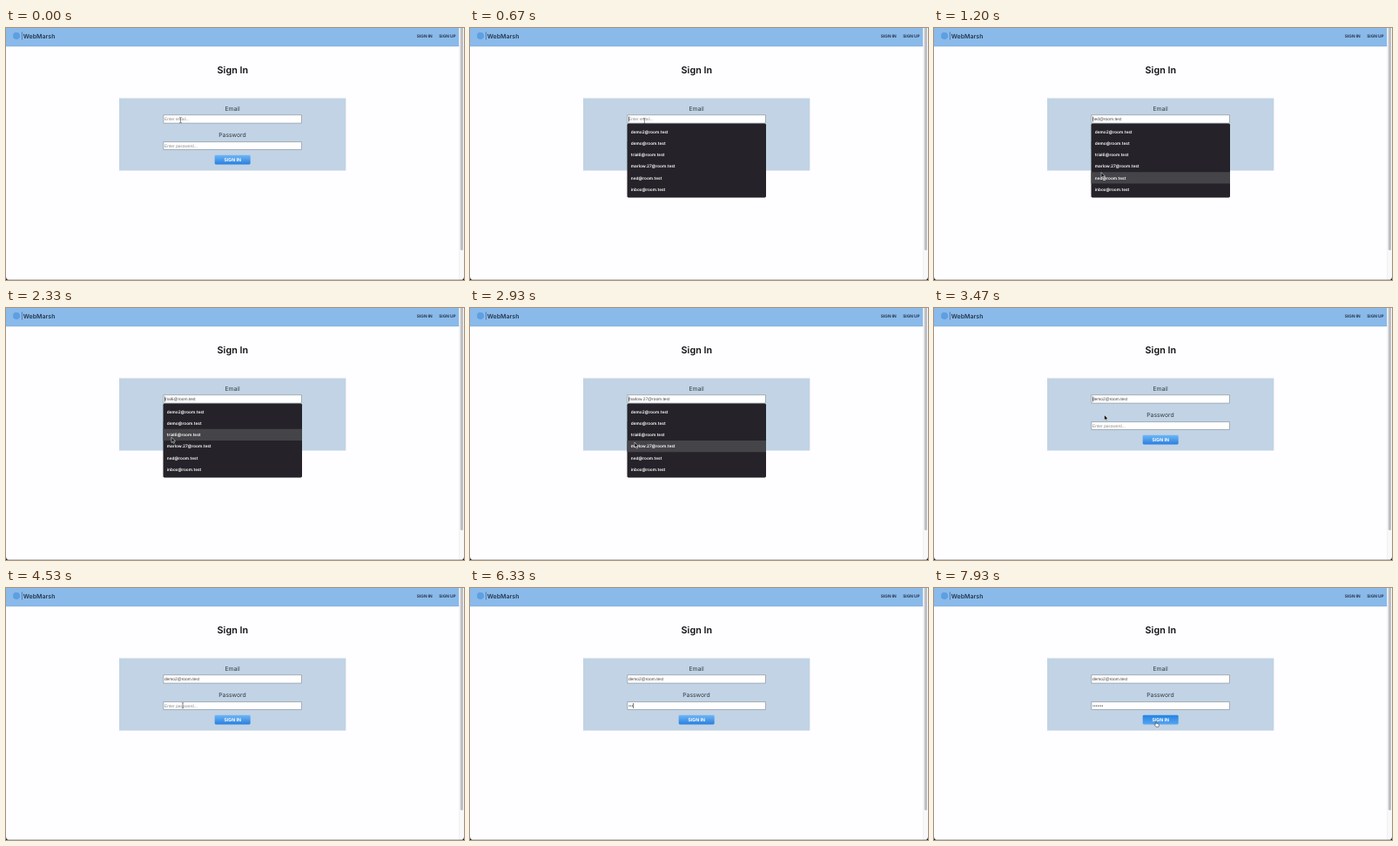
Write an HTML page that moves like this. It is 526 px wide and 289 px high and loops after 8 s.

```html
<!DOCTYPE html>
<html lang="en">
<head>
<meta charset="utf-8">
<title>Sign In</title>
<style>
  html, body { margin: 0; width: 100%; height: 100%; overflow: hidden; background: #fefdff; }
  svg { display: block; width: 526px; height: 289px; font-family: Inter, Roboto, sans-serif; text-rendering: geometricPrecision; }
  .mid { text-anchor: middle; }
  .label { font-size: 6.8px; fill: #333a42; }
  .nav { font-size: 4.8px; font-weight: 700; fill: #26374b; }
  .box { fill: #fff; stroke: #8d949c; stroke-width: .7; }
  .field { font: 4.88px "Liberation Sans", Arial, sans-serif; }
  .list text { font-size: 4.75px; font-weight: 600; fill: #fff; }
</style>
</head>
<body>
<svg viewBox="0 0 526 289">
  <defs>
    <linearGradient id="idle" x2="0" y2="1">
      <stop stop-color="#6db6f5"/><stop offset="1" stop-color="#2b80df"/>
    </linearGradient>
    <linearGradient id="hover" x2="0" y2="1">
      <stop stop-color="#2583e2"/><stop offset="1" stop-color="#55a5f2"/>
    </linearGradient>
  </defs>

  <rect width="526" height="289" fill="#fefdff"/>
  <rect width="520.5" height="21" fill="#8abaea"/>
  <rect y="20.5" width="520.5" height=".7" fill="#7faedd"/>
  <circle cx="12" cy="9" r="4" fill="#5d9fe3"/>
  <path d="M18.4 4.5V13.5" stroke="#3b5876" stroke-width=".6"/>
  <text x="19.8" y="11.6" font-size="7" font-weight="600" fill="#26374b">WebMarsh</text>
  <text class="nav" x="471.8" y="10.5">SIGN IN</text>
  <text class="nav" x="497.2" y="10.5">SIGN UP</text>

  <text class="mid" x="260.3" y="52.3" font-size="10.8" font-weight="600" fill="#111">Sign In</text>
  <rect x="130" y="80.5" width="260.3" height="83" fill="#c1d3e5"/>
  <text class="mid label" x="260" y="94.6">Email</text>
  <text class="mid label" x="260" y="125.4">Password</text>
  <rect id="emailBox" class="box" x="180.9" y="99.8" width="158.4" height="9.3"/>
  <text id="email" class="field" x="181.9" y="106.3"></text>
  <rect id="passBox" class="box" x="180.9" y="130.7" width="158.4" height="8.7"/>
  <text id="hint" class="field" x="181.9" y="136.9" fill="#8a8a8a">Enter password...</text>
  <g id="dots" fill="#333"></g>
  <rect id="button" x="239.7" y="145.8" width="41" height="10.6" rx="1.3"/>
  <text class="mid" x="260.2" y="152.9" font-size="5.2" font-weight="700" fill="#fff">SIGN IN</text>

  <g id="list" class="list">
    <rect x="180.5" y="109.6" width="159.5" height="84.8" rx="1.6" fill="#252329"/>
    <rect id="bar" x="180.5" width="159.5" height="13.2" fill="#454449"/>
  </g>
  <rect id="caret" width=".6" height="6" fill="#222"/>

  <rect x="520.5" width="5.5" height="289" fill="#f8f8f9"/>
  <path d="M520.5 0V289" stroke="#e6e6e8" stroke-width=".5"/>
  <rect x="521.8" y="-4" width="3.2" height="259" rx="1.6" fill="#bfbfc1"/>
  <path d="M0 285Q0 289 4 289H0ZM526 285Q526 289 522 289H526Z" fill="#222"/>
  <path d="M3 288.7H523" stroke="#8c8c90" stroke-width=".6"/>

  <path id="arrow" d="M0 0V6.2L1.5 4.9L2.5 7.1L3.5 6.6L2.5 4.5H4.5Z" fill="#111" stroke="#fff" stroke-width=".5"/>
  <path id="beam" d="M-1.2 -3.2Q0 -3.2 0 -2.4Q0 -3.2 1.2 -3.2M0 -2.4V2.4M-1.2 3.2Q0 3.2 0 2.4Q0 3.2 1.2 3.2" fill="none" stroke="#444" stroke-width=".6"/>
  <path id="hand" d="M0 0Q.7 -.6 1 .3V2.2L3.6 2.9Q4.2 3.2 4 4.2L3.4 6H.4L-1.5 3.4Q-1.3 2.6 -.2 3.5Z" fill="#fff" stroke="#222" stroke-width=".5"/>
</svg>
<script>
const LOOP = 8000, ROW_TOP = 112.4, ROW = 13.2, DOT = 1.75;
const $ = id => document.getElementById(id);
const set = (id, attrs) => { for (const k in attrs) $(id).setAttribute(k, attrs[k]); };
const show = (id, on) => set(id, { visibility: on ? "visible" : "hidden" });
const add = (parent, tag, attrs) => {
  const el = document.createElementNS("http://www.w3.org/2000/svg", tag);
  for (const k in attrs) el.setAttribute(k, attrs[k]);
  return $(parent).appendChild(el);
};

const mails = ["demo2", "demo", "trial6", "marlow.27", "ned", "inbox"].map(n => n + "@room.test");
mails.forEach((m, i) => {
  add("list", "text", { x: 184.8, y: ROW_TOP + i * ROW + 8.4 }).textContent = m;
});

// Pointer stops: time, x, y
const stops = [
  [0, 200.5, 105.6], [640, 200.5, 105.6], [930, 197, 138], [1200, 192, 165.5],
  [1470, 192, 166], [1900, 192, 166], [2300, 190, 148], [2720, 189.5, 168],
  [2930, 189, 154], [3300, 195.5, 122], [3470, 195.5, 122.5],
  [4000, 203, 134.8], [7500, 203, 134.8], [7870, 254.5, 153.2], [LOOP, 254.5, 153.2]
];
const keys = [6070, 6270, 6330, 6530, 6800, 6930, 7070];
const blinks = [4530, 5000, 5530, 6000, 7530];
const OPEN = 130, PICK = 3470, SWITCH = 4000;
keys.forEach((_, i) => add("dots", "circle", { cx: 183 + i * DOT, cy: 135.1, r: .62 }));

function pointer(t) {
  const i = Math.max(1, stops.findIndex(s => s[0] > t));
  const [t0, x0, y0] = stops[i - 1], [t1, x1, y1] = stops[i];
  const p = (t - t0) / (t1 - t0), e = p * p * (3 - 2 * p);
  return [x0 + (x1 - x0) * e, y0 + (y1 - y0) * e];
}

function draw(t) {
  const [x, y] = pointer(t);
  const open = t >= OPEN && t < PICK;
  const row = open ? Math.floor((y - ROW_TOP) / ROW) : -1;
  const mail = t >= PICK ? mails[0] : mails[row];
  const typed = keys.filter(k => k <= t).length;
  const onPass = t >= SWITCH;

  $("email").textContent = mail || "Enter email...";
  set("email", { fill: mail ? "#444" : "#8a8a8a" });
  set("emailBox", { fill: mail ? "#e8f0fe" : "#fff" });
  set("passBox", { stroke: onPass ? "#6f7780" : "#8d949c" });
  show("list", open);
  show("bar", open && row >= 0);
  set("bar", { y: ROW_TOP + Math.max(row, 0) * ROW });

  show("hint", !typed);
  [...$("dots").children].forEach((d, i) => d.setAttribute("visibility", i < typed ? "visible" : "hidden"));
  const lit = blinks.filter(b => b <= t).length % 2 === 0;
  show("caret", t >= 70 && lit);
  set("caret", { x: 182 + typed * DOT, y: onPass ? 132 : 101.5 });

  const overButton = x > 239.7 && x < 280.7 && y > 145.8 && y < 156.4;
  const overInput = y < 109.5 || (!open && y > 130.5 && y < 139.5);
  const hidden = t >= keys[0] && t < 7500;
  set("button", { fill: `url(#${overButton ? "hover" : "idle"})` });
  const kind = overButton ? "hand" : overInput ? "beam" : "arrow";
  for (const id of ["arrow", "beam", "hand"]) {
    show(id, id === kind && !hidden);
    set(id, { transform: `translate(${x} ${y})` });
  }
}

const start = performance.now();
(function tick() {
  draw((performance.now() - start) % LOOP);
  requestAnimationFrame(tick);
})();
</script>
</body>
</html>
```
